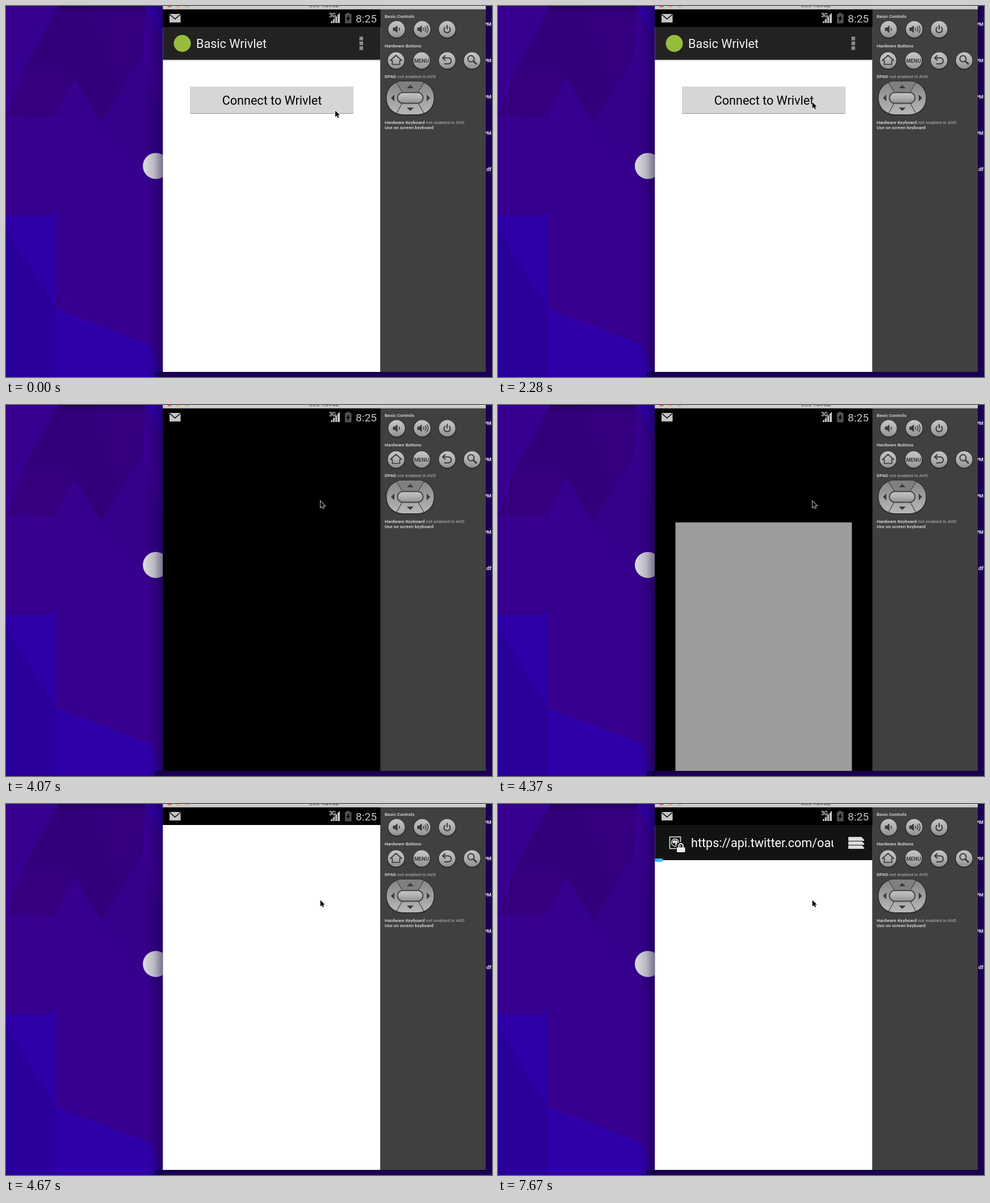
An HTML page that plays this animation: 856x654 px, repeating every 8000 ms.

```html
<!DOCTYPE html>
<html lang="en">
<head>
<meta charset="utf-8">
<title>Emulator sign-in</title>
<style>
  html, body { margin: 0; width: 100%; height: 100%; overflow: hidden; background: #37008f; }
  svg { display: block; width: 856px; height: 654px; font-family: Roboto, sans-serif; }
  .label { font-size: 8px; fill: #a2a2a2; font-weight: 500; }
  .label .strong { fill: #cbcbcb; font-weight: 700; }
  .icon { fill: none; stroke: #3b3b3b; stroke-width: 2; stroke-linejoin: round; }
</style>
</head>
<body>
<svg viewBox="0 0 856 654">
  <defs>
    <clipPath id="screen"><rect x="276" y="37" width="383.500" height="608"/></clipPath>
    <clipPath id="address"><rect x="338" y="50" width="253" height="40"/></clipPath>
    <linearGradient id="shadeLeft">
      <stop offset="0" stop-color="#10003c" stop-opacity="0"/>
      <stop offset=".5" stop-color="#10003c" stop-opacity=".15"/>
      <stop offset="1" stop-color="#10003c" stop-opacity=".5"/>
    </linearGradient>
    <linearGradient id="shadeBottom" x2="0" y2="1">
      <stop offset="0" stop-color="#080030" stop-opacity=".75"/>
      <stop offset="1" stop-color="#080030" stop-opacity=".5"/>
    </linearGradient>
    <linearGradient id="shadeTop" x2="0" y2="1">
      <stop offset="0" stop-color="#14003c" stop-opacity=".4"/>
      <stop offset="1" stop-color="#14003c" stop-opacity="0"/>
    </linearGradient>
    <linearGradient id="shadeRight">
      <stop offset="0" stop-color="#0c0034" stop-opacity=".75"/>
      <stop offset="1" stop-color="#0c0034" stop-opacity=".5"/>
    </linearGradient>
    <linearGradient id="titlebar" x2="0" y2="1">
      <stop offset="0" stop-color="#dadada"/><stop offset="1" stop-color="#bcbcbc"/>
    </linearGradient>
    <linearGradient id="metal" x2="0" y2="1">
      <stop offset="0" stop-color="#c6c6c6"/>
      <stop offset=".5" stop-color="#b0b0b0"/>
      <stop offset="1" stop-color="#909090"/>
    </linearGradient>
    <linearGradient id="padMetal" x2="0" y2="1">
      <stop offset="0" stop-color="#858585"/>
      <stop offset="1" stop-color="#b8b8b8"/>
    </linearGradient>
    <linearGradient id="progress">
      <stop offset="0" stop-color="#33b5e5"/>
      <stop offset=".75" stop-color="#45bdea"/>
      <stop offset="1" stop-color="#45bdea" stop-opacity=".3"/>
    </linearGradient>
  </defs>

  <!-- Desktop -->
  <rect width="856" height="654" fill="#37008f"/>
  <path d="M92 0H245L240 90 167 205 121 128 84 136 97 112 33 110Z" fill="#32007a"/>
  <path d="M150 0H245L238 92 205 145Z" fill="#34007f"/>
  <path d="M245 0H276V60Z" fill="#2e00a6"/>
  <path d="M240 90 276 195V340L167 205Z" fill="#35008a"/>
  <path d="M0 195 84 197 121 128 97 112 33 110Z" fill="#34007f"/>
  <path d="M0 370H80L88 357V534L0 390Z" fill="#2e00a9"/>
  <path d="M0 390 88 534V654H0Z" fill="#2a009b"/>
  <path d="M88 534 257 599 272 654H88Z" fill="#2f00a9"/>
  <rect x="92" width="153" height="12" fill="url(#shadeTop)"/>
  <circle cx="264" cy="282" r="23" fill="#d9d9dc"/>
  <rect x="244" width="33" height="654" fill="url(#shadeLeft)"/>
  <rect y="645" x="262" width="594" height="9" fill="url(#shadeBottom)"/>
  <rect x="845" width="11" height="645" fill="url(#shadeRight)"/>
  <g id="files" font-family="Liberation Sans, sans-serif" font-size="9.5" font-weight="700" fill="#eee" text-anchor="end"></g>

  <!-- Emulator window -->
  <rect x="276.300" width="568.700" height="645" fill="#404040"/>
  <rect x="276.300" width="568.700" height="6" fill="url(#titlebar)"/>
  <circle cx="288" cy="-3" r="5.3" fill="#e8564c"/>
  <circle cx="303.500" cy="-3" r="5.3" fill="#e9b23d"/>
  <circle cx="319" cy="-3" r="5.3" fill="#b6b6b6"/>
  <text x="560" y="2" font-family="Open Sans, sans-serif" font-size="11" fill="#444" text-anchor="middle">5554:avd2</text>
  <rect x="276.300" y="6" width="383.200" height="639"/>

  <!-- Status bar -->
  <g fill="#c4c4c4">
    <path d="M288 14H307.500V29H288Z"/>
    <path d="M288.500 15 297.700 23 307 15" fill="none" stroke="#000" stroke-width="1.5"/>
    <text x="569" y="20" font-size="10" font-weight="700" letter-spacing="-.5">3G</text>
    <path d="M572 30V28L575 25V30ZM576 30V24L579 21V30ZM580 30V20L583 17V30ZM584 30V16L588 12V30Z"/>
    <path d="M600 12H605V14H608.500V30.500H597V14H600Z" fill="#505050"/>
    <path d="M604.500 16 599 23H602L600.500 28 606.500 21H603.500Z" fill="#000"/>
    <text x="616" y="29" font-size="19.200">8:25</text>
  </g>

  <!-- App, launched page and browser bar -->
  <g clip-path="url(#screen)">
    <g id="app">
      <rect x="276.300" y="37" width="383.200" height="608" fill="#fff"/>
      <rect x="276.300" y="37" width="383.200" height="57" fill="#222"/>
      <rect x="276.300" y="93" width="383.200" height="1.800" fill="#141414"/>
      <rect x="276.300" y="94.800" width="383.200" height="1.500" fill="#c8c8c8"/>
      <circle cx="310.500" cy="66" r="15" fill="#97bd3d"/>
      <text x="335" y="73.500" font-size="21.600" fill="#f3f3f3">Basic Wrivlet</text>
      <path d="M622.500 54h6.500v6.500h-6.500ZM622.500 62.500h6.500v6.500h-6.500ZM622.500 71h6.500v6.500h-6.500Z" fill="#8a8a8a"/>
      <rect x="324" y="142" width="288" height="48" rx="1.500" fill="#969696"/>
      <rect id="button" x="324" y="142" width="288" height="47" rx="1.500"/>
      <text x="468.500" y="174" font-size="21.600" text-anchor="middle">Connect to Wrivlet</text>
    </g>
    <rect id="page"/>
    <g id="bar">
      <rect x="276.300" y="37" width="383.200" height="62" fill="#111413"/>
      <rect x="276.300" y="96" width="15" height="6" rx="1" fill="url(#progress)"/>
      <g id="barContent">
        <rect x="302.500" y="58" width="19" height="20.500" fill="none" stroke="#eee" stroke-width="1.500"/>
        <circle cx="312" cy="68" r="6.500" fill="none" stroke="#eee" stroke-width="1.300"/>
        <path d="M307 66 311 63 313 67 309 70ZM313 63 317 66 315 71 312 73Z" fill="#eee"/>
        <path d="M318 77V73.500a4 4 0 0 1 8 0V77" fill="none" stroke="#111413" stroke-width="5"/>
        <rect x="314" y="75.500" width="16.500" height="10" fill="#111413"/>
        <path d="M318.500 77V73.500a3.700 3.700 0 0 1 7.400 0V77" fill="none" stroke="#eee" stroke-width="2"/>
        <rect x="315" y="76.500" width="14.500" height="8.500" rx="1" fill="#eee"/>
        <g clip-path="url(#address)">
          <text x="340" y="76" font-size="21.600" fill="#fff">https://api.twitter.com/oau</text>
        </g>
      </g>
      <path d="M617 58H640L645 63V65H617ZM617 66H641L645 70V72H617ZM617 73H641L645 77V79H617Z" fill="#dcdcdc"/>
    </g>
  </g>

  <!-- Hardware panel -->
  <g class="label">
    <text x="667" y="20.500" class="strong">Basic Controls</text>
    <text x="667" y="72.500" class="strong">Hardware Buttons</text>
    <text x="667" y="127"><tspan class="strong">DPAD</tspan> not enabled in AVD</text>
    <text x="667" y="207.500"><tspan class="strong">Hardware Keyboard</tspan> not enabled in AVD</text>
    <text x="667" y="216.500" class="strong">Use on screen keyboard</text>
  </g>
  <g id="keys"></g>
  <g class="icon">
    <path d="M682 38.500H685L689 35V47L685 43.500H682Z" fill="#3b3b3b" stroke-width="1"/>
    <path d="M692 38.500q2 2.500 0 5" stroke-width="1.500"/>
    <path d="M725 38.500H728L732 35V47L728 43.500H725Z" fill="#3b3b3b" stroke-width="1"/>
    <path d="M735 38.500q2 2.500 0 5M738 36.500q3.500 4.500 0 9M741 34.500q5 6.500 0 13" stroke-width="1.500"/>
    <path d="M774 37a5.500 5.500 0 1 0 6 0M777 33.500V41"/>
    <path d="M677 96 687 87 697 96H693.500V103H680.500V96Z" stroke-width="1.700"/>
    <path d="M774 87 769 91.500 774 96M769.500 91.500H779a5 5 0 0 1 0 10.500H772"/>
    <circle cx="819" cy="93" r="5.500"/>
    <path d="M823 97 829 103" stroke-width="3"/>
  </g>
  <text x="732" y="99.500" font-size="9.300" font-weight="700" fill="#3b3b3b" text-anchor="middle">MENU</text>
  <rect x="669" y="132" width="86" height="61" rx="29" fill="#2c2c2c"/>
  <rect x="670.500" y="133" width="83" height="58" rx="28" fill="url(#padMetal)"/>
  <path d="M688 135 698 152H726L736 135Q731 133 726 133H698Q693 133 688 135Z" fill="#808080"/>
  <path d="M688 135 698 152M736 135 726 152M688 189 698 171M736 189 726 171" stroke="#484848" stroke-width="1.300"/>
  <rect x="689.500" y="152.500" width="45" height="19" rx="9.500" fill="url(#metal)" stroke="#444" stroke-width="2"/>
  <path d="M706 145 712 139 718 145ZM706 179 712 185 718 179ZM684 156 678 162 684 168ZM741 156 747 162 741 168Z" fill="#3b3b3b"/>

  <path id="cursor" d="M0 0V11L2.600 8.700 4.400 12.500 6.200 11.700 4.500 8H8Z" stroke="#fff" stroke-width="1.400" paint-order="stroke"/>
</svg>
<script>
const LOOP = 8000;
const el = id => document.getElementById(id);

// Latest value whose start time has passed.
const at = (steps, t) => steps.filter(([start]) => start <= t).pop()[1];

const cursorSteps = [[0, [580, 184.5]], [1350, [576.5, 184.5]], [1530, [555.5, 170.5]], [1680, [553.7, 169.5]]];
const buttonSteps = [[0, '#d6d6d6'], [1980, '#86d0ea'], [2280, '#d6d6d6']];
const appSteps = [[0, [1, 1, 0]], [3930, [0.962, 0.93, -28.8]], [4070, [1, 0, 0]]];
// Width scale, top edge and opacity of the opening page.
const pageSteps = [[0, [0, 645, 0]], [4220, [0.677, 402, 0.3]], [4370, [0.811, 207, 0.615]],
  [4520, [0.99, 41, 0.94]], [4670, [1, 37, 1]]];
const barSteps = [[0, [0, 1]], [7220, [0.29, 1.013]], [7370, [0.68, 1.009]], [7520, [1, 1.005]], [7670, [1, 1]]];

const scaleAround = (s, x, y, dy = 0) => `translate(${x} ${y + dy}) scale(${s}) translate(${-x} ${-y})`;

function setAttributes(id, attributes) {
  for (const [name, value] of Object.entries(attributes)) el(id).setAttribute(name, value);
}

function buildStatic() {
  el('files').innerHTML = ['PM', 'PM', 'PM', 'PM', 'df']
    .map((text, i) => `<text x="855" y="${35 + i * 63.9}">${text}</text>`).join('');
  const centers = [[688, 41], [733, 41], [777, 41], [687, 96], [732, 96], [777, 96], [821, 96]];
  el('keys').innerHTML = centers.map(([x, y]) =>
    `<circle cx="${x}" cy="${y + 1}" r="16" fill="#303030"/>
     <circle cx="${x}" cy="${y}" r="14.5" fill="url(#metal)"/>`).join('');
}

function render(t) {
  setAttributes('cursor', { transform: `translate(${at(cursorSteps, t)})` });
  setAttributes('button', { fill: at(buttonSteps, t) });

  const [appScale, appOpacity, lift] = at(appSteps, t);
  setAttributes('app', { transform: scaleAround(appScale, 468, 325.5, lift), opacity: appOpacity });

  const [pageScale, top, pageOpacity] = at(pageSteps, t);
  const width = 383.2 * pageScale;
  setAttributes('page', {
    x: 467.9 - width / 2, y: top, width, height: 645 - top,
    fill: pageScale < 1 ? '#fdfffc' : '#fff', opacity: pageOpacity
  });

  const [barOpacity, contentScale] = at(barSteps, t);
  setAttributes('bar', { opacity: barOpacity });
  setAttributes('barContent', { transform: scaleAround(contentScale, 466, 68) });
}

buildStatic();
const start = performance.now();
function tick() {
  render((performance.now() - start) % LOOP);
  requestAnimationFrame(tick);
}
tick();
</script>
</body>
</html>
```
